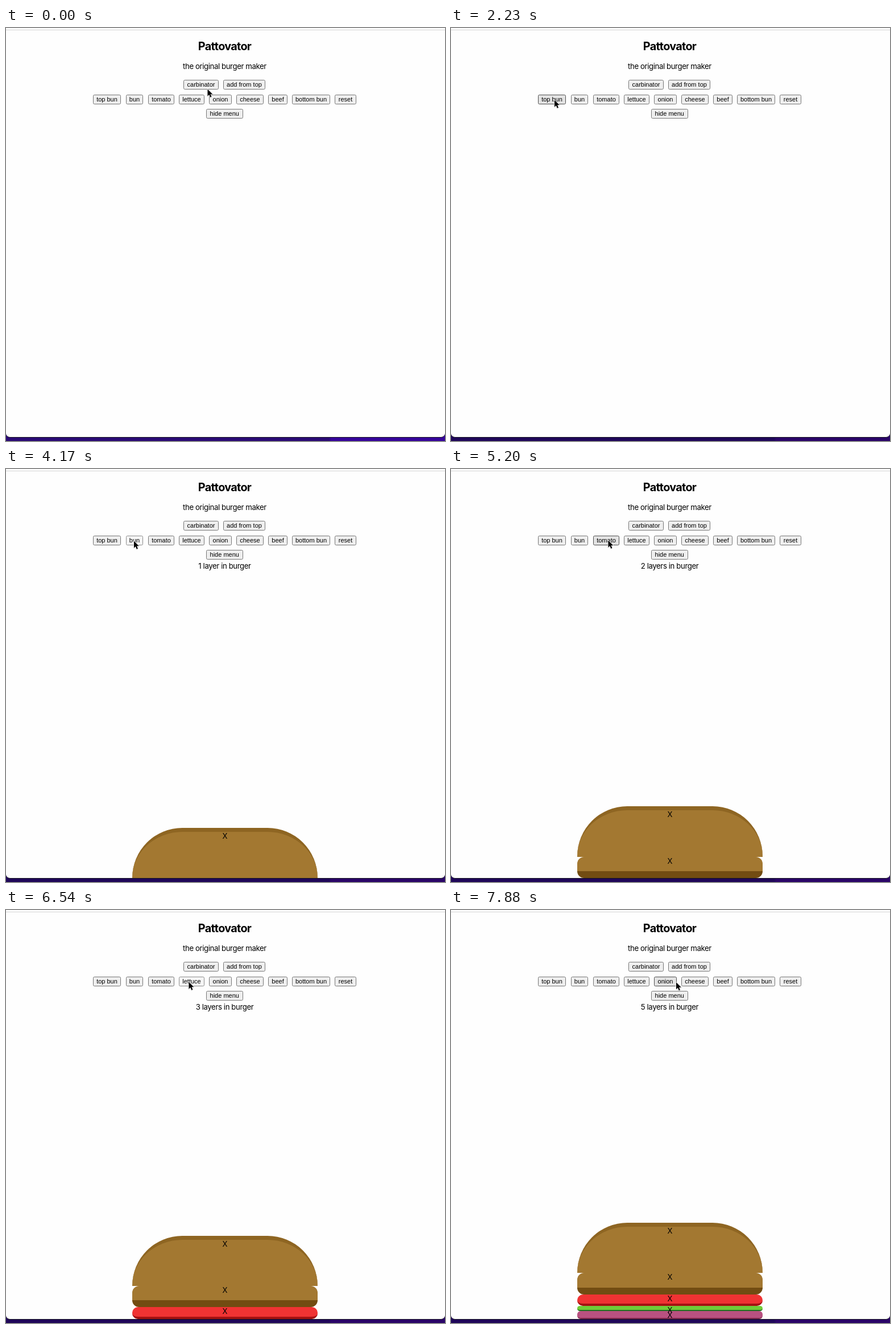
An HTML page that plays this animation: 772 by 725 pixels, repeating every 8000 ms.

```html
<!DOCTYPE html>
<html lang="en">
<head>
<meta charset="utf-8">
<title>Pattovator</title>
<style>
  html, body { margin: 0; width: 100%; height: 100%; overflow: hidden; }
  body { position: relative; background: #14102a; color: #000; }
  #desk {
    position: absolute; left: 0; top: 708px; width: 772px; height: 17px;
    background: linear-gradient(90deg, #2a0a74 0 568px, #36059a 572px);
  }
  #desk.dim { background: linear-gradient(90deg, #1f0759 0 568px, #2a0568 572px); }
  #page {
    position: absolute; left: 0; top: 0; width: 772px; height: 718px;
    overflow: hidden; background: #fefefe;
    border-bottom: 1px solid #15131f; border-radius: 0 0 7px 7px;
  }
  #page::before {
    content: ""; position: absolute; left: 0; right: 0; top: 3px;
    height: 1px; background: #d4d4d4;
  }
  h1, p, .layer {
    margin: 0; font: 13.2px/20px Inter, "Open Sans", sans-serif;
    letter-spacing: -.03em; text-align: center;
  }
  h1, p { position: absolute; left: 0; width: 769px; white-space: nowrap; }
  h1 { top: 20px; font-size: 19.8px; line-height: 25px; font-weight: 700; letter-spacing: -.035em; }
  #tagline { top: 57px; }
  #count { top: 160px; }
  .btn {
    position: absolute; box-sizing: border-box; height: 17px;
    border: 1px solid #767676; border-radius: 2.5px; background: #efefef;
    font: 11px/15px "Liberation Sans", Arial, sans-serif;
    text-align: center; white-space: nowrap;
  }
  .btn.hover { background: #e3e3e3; border-color: #4f4f4f; }
  .btn.press { background: #f5f5f5; border-color: #8d8d8d; }
  #burger { position: absolute; left: 222px; bottom: 0; width: 325.5px; }
  .layer { box-sizing: border-box; line-height: 14px; border: 0 solid; display: none; }
  .top { height: 88.5px; background: #a37831; border-color: #8e6522; border-top-width: 7px; border-radius: 88px 88px 0 0; }
  .bun { height: 37.2px; background: #a37831; border-color: #724c12; border-bottom-width: 12.4px; border-radius: 12px; }
  .tomato { height: 20.6px; background: #f03333; border-color: #a51212; border-bottom-width: 4px; border-radius: 10px; }
  .lettuce { height: 9.2px; background: #70cc37; border-color: #1f6d22; border-bottom-width: 2.6px; border-radius: 4.6px; }
  .onion { height: 13.6px; background: #b85180; border-color: #82284f; border-bottom-width: 2.4px; border-radius: 6px; }
  #cursor {
    position: absolute; left: 0; top: 0; width: 14px; height: 20px; overflow: visible;
    filter: drop-shadow(0 .6px .6px rgba(0, 0, 0, .35));
  }
</style>
</head>
<body>
<div id="desk"></div>
<div id="page">
  <h1>Pattovator</h1>
  <p id="tagline">the original burger maker</p>
  <p id="count"></p>
  <div id="burger">
    <div class="layer top">X</div>
    <div class="layer bun">X</div>
    <div class="layer tomato">X</div>
    <div class="layer lettuce">X</div>
    <div class="layer onion">X</div>
  </div>
</div>
<svg id="cursor"><path d="M0 0V12.2L2.8 9.6 4.8 14.2 6.9 13.3 5 8.8H8.8Z" stroke="#fff" stroke-width="1.6" stroke-linejoin="round" paint-order="stroke"/></svg>
<script>
const LOOP = 8000;
const $ = id => document.getElementById(id);

// Rows of buttons: top, then label, left, right
const rows = [
  [91, ["carbinator", 312, 374], ["add from top", 382, 456]],
  [116.5, ["top bun", 153, 202], ["bun", 211, 241], ["tomato", 250, 296],
    ["lettuce", 304, 349], ["onion", 357, 397], ["cheese", 405, 453],
    ["beef", 461, 495], ["bottom bun", 503, 570], ["reset", 578, 616]],
  [141.5, ["hide menu", 352, 416.5]]
];
const buttons = rows.flatMap(([top, ...items]) => items.map(([label, left, right]) => {
  const el = document.createElement("div");
  el.className = "btn";
  el.textContent = label;
  el.style.cssText = `left:${left}px;top:${top}px;width:${right - left}px`;
  $("page").append(el);
  return { el, left, right, top, bottom: top + 17 };
}));

// Pointer stops: time, x, y
const stops = [
  [0, 354.5, 107.5], [150, 340, 110], [300, 300, 105], [450, 250, 103],
  [600, 212, 105], [750, 190, 110], [900, 204, 123],
  [1940, 195, 124], [2090, 185, 126], [2230, 182, 126.5],
  [3280, 183.5, 127], [3430, 192, 127], [3570, 208, 127], [3720, 222, 126.5],
  [4020, 225, 126.5],
  [5060, 255, 126], [5200, 276.5, 125.5], [5500, 276.5, 126],
  [6100, 288, 126], [6250, 306, 126.5], [6390, 317, 126.5], [6540, 321.5, 126.5],
  [7140, 330, 126.5], [7290, 352, 126], [7440, 370, 126], [7580, 379, 126],
  [7880, 396, 127]
];
const added = [2380, 4310, 5500, 6690, 7730];
const presses = [[4160, 4310], [6540, 6690]];
const layers = [...document.querySelectorAll(".layer")];

function draw(t) {
  const [, x, y] = stops.findLast(s => s[0] <= t);
  $("cursor").style.transform = `translate(${x}px, ${y}px)`;

  const pressed = presses.some(([from, to]) => t >= from && t < to);
  for (const b of buttons) {
    const over = x >= b.left && x <= b.right && y + 1 > b.top && y + 1 < b.bottom;
    b.el.className = "btn" + (over ? pressed ? " press" : " hover" : "");
  }

  const n = added.filter(a => a <= t).length;
  layers.forEach((el, i) => el.style.display = i < n ? "block" : "none");
  $("count").textContent = n ? `${n} layer${n > 1 ? "s" : ""} in burger` : "";
  $("desk").className = t >= 1640 ? "dim" : "";
}

const start = performance.now();
function tick() {
  draw((performance.now() - start) % LOOP);
  requestAnimationFrame(tick);
}
tick();
</script>
</body>
</html>
```
